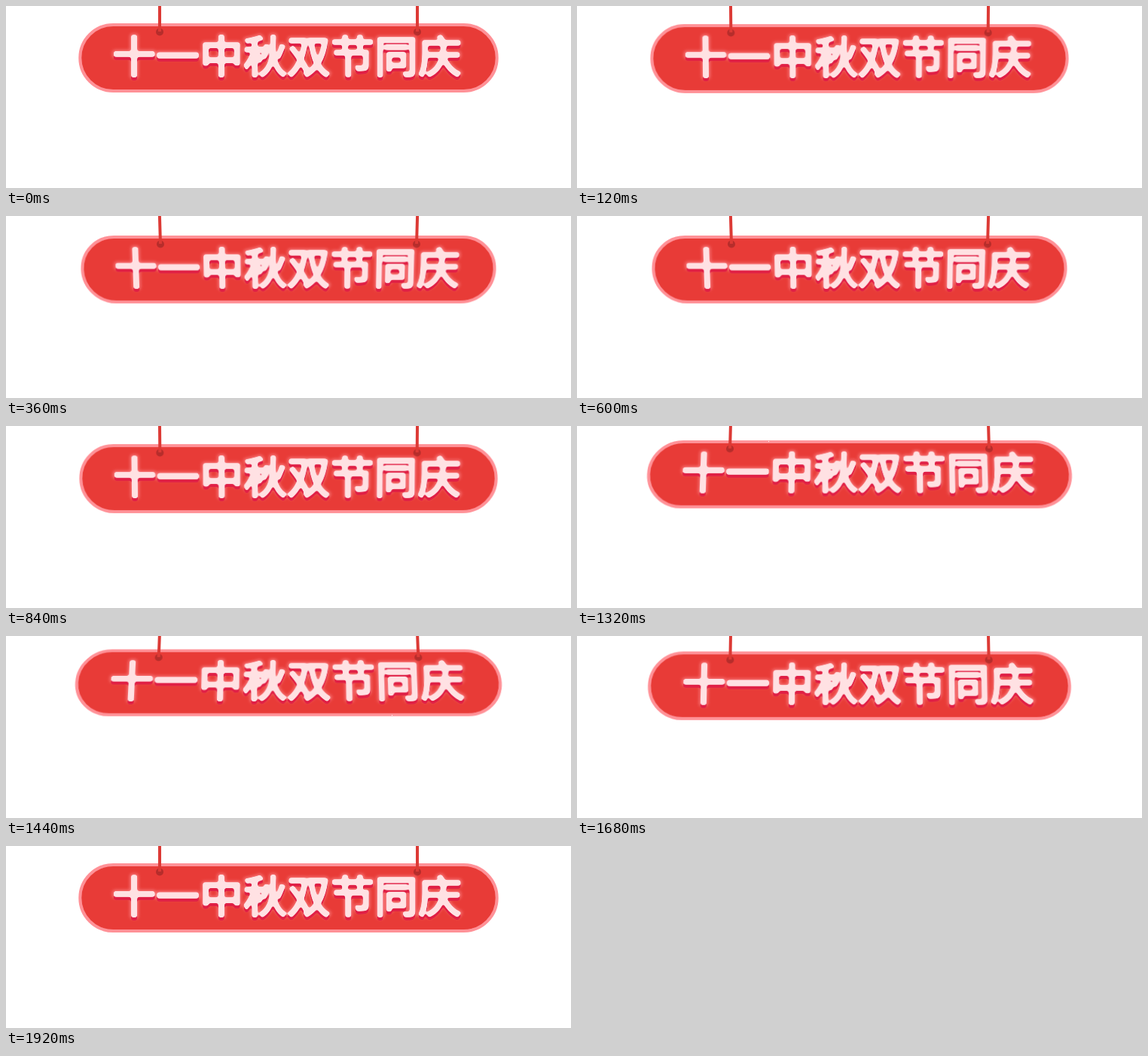
Animation, 750 px wide and 242 px high, one loop 2040 ms. Source, as an HTML page:

```html
<!DOCTYPE html>
<html lang="zh-CN">
<head>
<meta charset="utf-8">
<title>十一中秋双节同庆</title>
<style>
  html, body { margin: 0; width: 100%; height: 100%; overflow: hidden; background: #fff; }
  #sign {
    position: absolute; left: 0; top: 0; width: 750px; height: 242px;
    overflow: visible; transform-origin: 375px 0;
  }
  text {
    font: 300 57px "Noto Sans CJK SC", "Noto Sans CJK", sans-serif;
    letter-spacing: 1px; stroke-width: 4px; stroke-linejoin: round;
  }
  .glow { fill: #ff9499; stroke: #ff9499; stroke-width: 6px; filter: blur(2px); opacity: .75; }
  .shade { fill: #e01f45; stroke: #e01f45; filter: url(#rounded); }
  .face { fill: #ffe1e3; stroke: #ffe1e3; filter: url(#rounded); }
</style>
</head>
<body>
<svg id="sign" viewBox="0 0 750 242">
  <!-- Blur and re-sharpen the alpha to round the stroke ends. -->
  <filter id="rounded" color-interpolation-filters="sRGB">
    <feGaussianBlur stdDeviation="1.7"/>
    <feComponentTransfer><feFuncA type="linear" slope="5" intercept="-2.3"/></feComponentTransfer>
  </filter>
  <rect x="98.3" y="25" width="553.4" height="88" rx="44" fill="#e83b37" stroke="#ff9197" stroke-width="4"/>
  <g fill="#b62d2b">
    <circle cx="204" cy="34.5" r="5"/>
    <circle cx="546" cy="34.5" r="5"/>
  </g>
  <path d="M204-20V34M546-20V34" stroke="#dc3a35" stroke-width="4"/>
  <text class="glow" x="141.5" y="88" aria-hidden="true">十一中秋双节同庆</text>
  <text class="shade" x="141.5" y="92" aria-hidden="true">十一中秋双节同庆</text>
  <text class="face" x="141.5" y="88">十一中秋双节同庆</text>
</svg>
<script>
  const STEP = 120, COUNT = 17, QUARTER = 4;

  // Linear swing: rest, back, rest, forward, rest.
  const swingAt = i => {
    const phase = (i + QUARTER) % (4 * QUARTER);
    return QUARTER - Math.abs(phase - 2 * QUARTER);
  };

  // Tilt about the top edge; positive swing leans away from the viewer.
  const tilt = n => {
    const depth = 5.6e-5 * n;
    const squash = 1 + 0.0075 * n - 0.002 * n * n;
    return `matrix3d(1,0,0,0, 0,${squash},0,${depth}, 0,0,1,0, 0,${n},0,1)`;
  };

  const frames = Array.from({ length: COUNT + 1 }, (_, i) => ({
    offset: i / COUNT,
    transform: tilt(swingAt(Math.min(i, COUNT - 1))),
    easing: "steps(1, end)"
  }));

  document.getElementById("sign").animate(frames, { duration: STEP * COUNT, iterations: Infinity });
</script>
</body>
</html>
```
